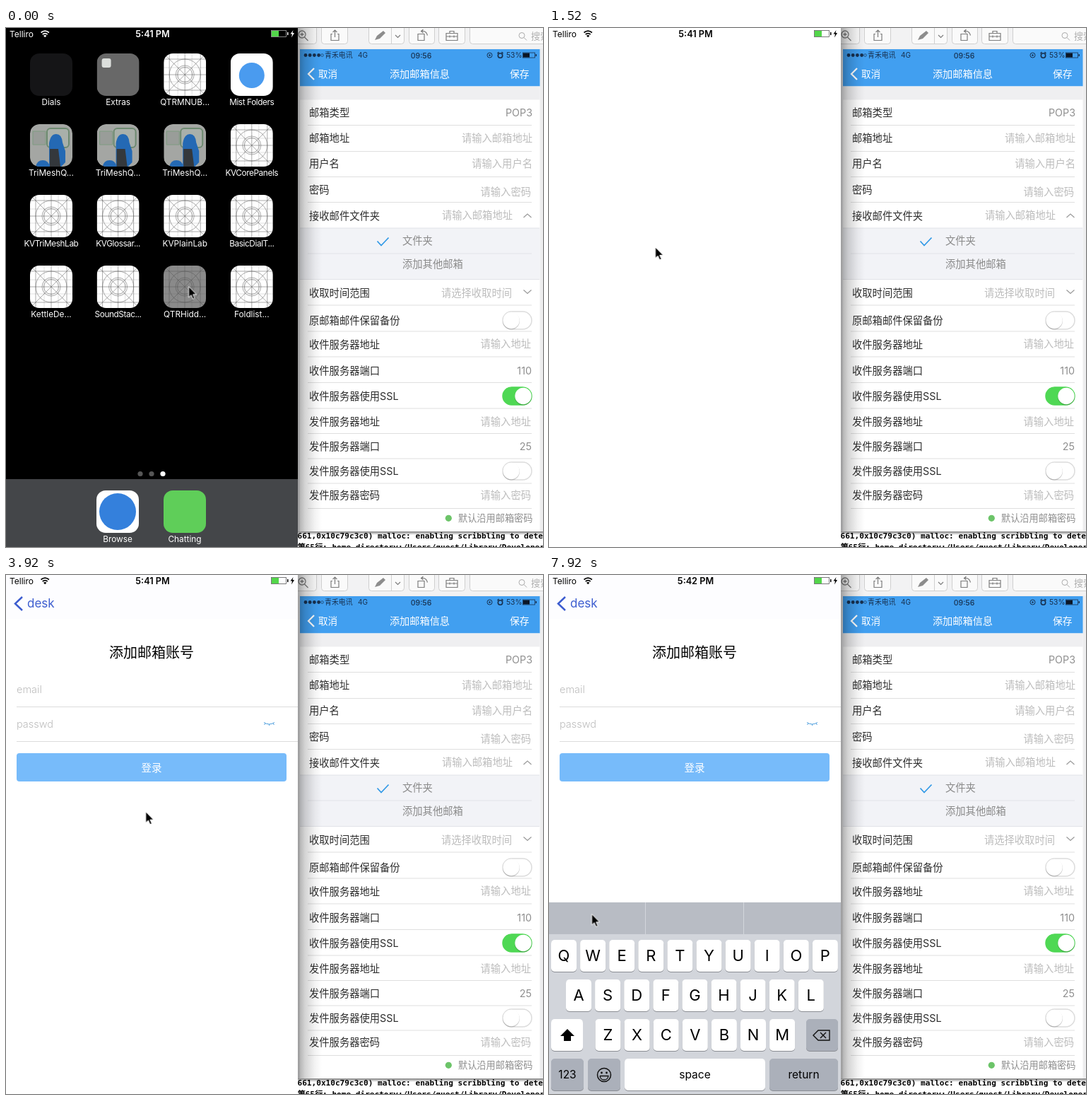
An HTML page for the animation above (8000 ms loop, 760 px wide and 734 px high).

```html
<!DOCTYPE html>
<html lang="zh">
<head>
<meta charset="utf-8">
<title>Mail account demo</title>
<style>
@property --p { syntax: '<number>'; inherits: true; initial-value: 0; }
@property --q { syntax: '<number>'; inherits: true; initial-value: 0; }
@property --k { syntax: '<number>'; inherits: true; initial-value: 0; }

html, body { margin: 0; width: 100%; height: 100%; overflow: hidden; background: #fff; }
#stage {
  position: relative; width: 760px; height: 734px; overflow: hidden;
  font-family: Inter, "Noto Sans CJK SC", "Noto Sans CJK", sans-serif;
  animation: launch 8s linear infinite, push 8s linear infinite, keys 8s linear infinite;
}
#stage div, #stage svg { position: absolute; left: 0; top: 0; }
svg { display: block; overflow: visible; }
#phone { width: 413px; height: 734px; background: #000; overflow: hidden; }
#home {
  width: 413px; height: 734px; transform-origin: 253px 366px;
  transform: scale(calc(1 + 2 * var(--p))); opacity: calc(1 - var(--p));
}
#stage #win {
  left: calc(223px * (1 - var(--p))); top: calc(336px * (1 - var(--p)));
  width: calc(60px + 353px * var(--p)); height: calc(60px + 674px * var(--p));
  border-radius: max(0px, 13px - 27px * var(--p));
  overflow: hidden; animation: tint 8s linear infinite;
}
#win svg { width: 100%; height: 100%; animation: gridOut 8s linear infinite; }
#app { width: 413px; height: 734px; animation: appear 8s step-end infinite; }
#first { width: 413px; height: 734px; background: #fff; transform: translateX(calc(-124px * var(--q))); }
#dim { width: 413px; height: 734px; background: #000; opacity: calc(.11 * var(--q)); }
#form { width: 413px; height: 734px; background: #fff; transform: translateX(calc(413px * (1 - var(--q)))); }
#nav { width: 413px; height: 62px; background: rgba(251, 252, 255, .55); }
#back { opacity: clamp(0, (var(--q) - .82) * 5.6, 1); }
#stage #crumb {
  left: calc(30px + 182px * (1 - var(--q)) - 24px * (1 - var(--q)) * (1 - var(--q)));
  top: 28px; font-size: 17px; line-height: 24px; animation: crumb 8s linear infinite;
}
#status { animation: ink 8s linear infinite; }
#before { animation: before 8s step-end infinite; }
#after { animation: after 8s step-end infinite; }
#keyboard { transform: translateY(calc(271px * (1 - var(--k)))); visibility: visible; }
#pointer { animation: move 8s ease-in-out infinite; }

@keyframes launch {
  0%, 4% { --p: 0; animation-timing-function: cubic-bezier(.5, 0, .9, .6); }
  6% { --p: .15; animation-timing-function: cubic-bezier(.25, .5, .3, 1); }
  10.5%, 100% { --p: 1; }
}
@keyframes push {
  0%, 40% { --q: 0; animation-timing-function: cubic-bezier(.3, .1, .6, .85); }
  43% { --q: .852; animation-timing-function: cubic-bezier(.2, .6, .4, 1); }
  46.25%, 100% { --q: 1; }
}
@keyframes keys {
  0%, 91% { --k: 0; animation-timing-function: cubic-bezier(.2, .7, .2, 1); }
  95.5%, 100% { --k: 1; }
}
@keyframes tint {
  0%, 4% { background: #8a8a8a; }
  6% { background: #dedede; }
  9%, 100% { background: #fff; }
}
@keyframes gridOut {
  0%, 4% { opacity: 1; }
  6% { opacity: .06; }
  7.5%, 100% { opacity: 0; }
}
@keyframes appear { 0% { opacity: 0; } 25%, 100% { opacity: 1; } }
@keyframes crumb { 0%, 40% { color: #111; } 42%, 100% { color: #3f5fd0; } }
@keyframes ink { 0%, 6.2% { color: #fff; } 8%, 100% { color: #000; } }
@keyframes before { 0% { opacity: 1; } 58%, 100% { opacity: 0; } }
@keyframes after { 0% { opacity: 0; } 58%, 100% { opacity: 1; } }
@keyframes move {
  0%, 1% { transform: translate(258.5px, 365.5px); }
  6%, 11% { transform: translate(255.5px, 385px); }
  18.5%, 26% { transform: translate(150.5px, 310px); }
  34%, 46% { transform: translate(221.5px, 373.5px); }
  56%, 90.5% { transform: translate(95.5px, 168.5px); }
  98%, 100% { transform: translate(60.5px, 479.5px); }
}
</style>
</head>
<body>
<div id="stage">
  <svg id="desk" width="760" height="734"></svg>
  <div id="phone">
    <div id="home"><svg id="icons" width="413" height="734"></svg></div>
    <div id="win"><svg viewBox="0 0 60 60" preserveAspectRatio="none"><use href="#grid"/></svg></div>
    <div id="app">
      <div id="first">
        <svg width="413" height="734">
          <rect x="26" y="341" width="361" height="50" fill="#2d00ff"/>
          <path d="M158 367l5-6h4v13h-4z" fill="#15103c"/>
        </svg>
        <div id="dim"></div>
      </div>
      <div id="form">
        <svg width="413" height="734">
          <text x="206" y="117" font-size="20" font-weight="300" text-anchor="middle" fill="#000">添加邮箱账号</text>
          <g font-size="14.5" font-weight="300" fill="#bdbdbd">
            <text x="15" y="167">email</text>
            <text x="15" y="216">passwd</text>
          </g>
          <path d="M15 186.500H413M15 235.500H413" stroke="#dcdcdc"/>
          <path d="M365 208.500q7.500 5 15 0M367 210l-1.500 2M372.500 211v2M378 210l1.500 2" fill="none" stroke="#4c9ddd"/>
          <rect x="15" y="252" width="382" height="40" rx="4" fill="#77bbfa"/>
          <text x="206" y="277.500" font-size="14.5" text-anchor="middle" fill="#fff">登录</text>
        </svg>
      </div>
      <div id="nav"></div>
      <svg id="back" width="40" height="62"><path d="M23 31L13 40.500L23 50" fill="none" stroke="#3c5ccf" stroke-width="2.5"/></svg>
      <div id="crumb">desk</div>
    </div>
    <svg id="status" width="413" height="20" fill="currentColor">
      <text x="5" y="13" font-size="12">Telliro</text>
      <g fill="none" stroke="currentColor" stroke-width="1.7">
        <path d="M49.500 6.500q5.700-4.600 11.400 0M51.700 9q3.500-2.800 7 0"/>
      </g>
      <path d="M53 10.800q2.200-1.600 4.400 0l-2.200 2.400z"/>
      <g font-size="12.7" font-weight="600" text-anchor="middle">
        <text id="before" x="207.500" y="13">5:41 PM</text>
        <text id="after" x="207.500" y="13">5:42 PM</text>
      </g>
      <rect x="375.500" y="3.500" width="21" height="9" fill="none" stroke="currentColor" stroke-opacity=".65" stroke-width=".8"/>
      <rect x="376" y="4" width="10" height="8" fill="#53d64b"/>
      <rect x="398" y="6" width="1.500" height="4"/>
      <path d="M406.500 3l-4 5.500h2.500l-1 5 4-6.500h-2.500z"/>
    </svg>
    <svg id="keyboard" width="413" height="734"></svg>
  </div>
  <svg id="pointer" width="14" height="20">
    <path d="M0 0V15.500L3.600 12.200L6 17.800L8.600 16.700L6.200 11.300H11z" fill="#000" stroke="#fff" stroke-width="1"/>
  </svg>
</div>

<script>
const $ = id => document.getElementById(id);
const rect = (x, y, w, h, fill, more = '') =>
  `<rect x="${x}" y="${y}" width="${w}" height="${h}" fill="${fill}" ${more}/>`;
const text = (x, y, s, size, fill, more = '') =>
  `<text x="${x}" y="${y}" font-size="${size}" fill="${fill}" ${more}>${s}</text>`;
const line = (d, stroke, width = 1) =>
  `<path d="${d}" fill="none" stroke="${stroke}" stroke-width="${width}"/>`;
const dot = (x, y, r, fill, more = '') => `<circle cx="${x}" cy="${y}" r="${r}" fill="${fill}" ${more}/>`;
const MID = 'text-anchor="middle"', END = 'text-anchor="end"';

// Home screen
const defs = `<defs>
  <clipPath id="tile"><rect width="60" height="60" rx="13"/></clipPath>
  <g id="grid" fill="none" stroke="#555" stroke-width=".5">
    <path d="M0 0L60 60M60 0L0 60M30 0V60M0 30H60M8 0V60M52 0V60M0 8H60M0 52H60"/>
    <path d="M20 0V60M40 0V60M0 20H60M0 40H60" stroke-opacity=".35"/>
    <circle cx="30" cy="30" r="10.500"/><circle cx="30" cy="30" r="13"/><circle cx="30" cy="30" r="22"/>
  </g>
  <g id="photo" clip-path="url(#tile)">
    <rect width="60" height="60" fill="#a4a6a3"/>
    <path d="M4 10H22V29H4z" fill="#999d99" stroke="#7f9b80"/>
    <rect x="24" y="6" width="31" height="27" rx="5" fill="#a9b0aa" stroke="#6d8a70" stroke-width="2"/>
    <path d="M8 60q2-9 10-9t10 9z" fill="#2469b4"/>
    <path d="M27 60V27q2-13 10-13t9 12l4 12v16l-6 6z" fill="#2469b4"/>
    <path d="M28 35H40l3 25H28z" fill="#34383c"/>
  </g></defs>`;

const fills = {
  grid: rect(0, 0, 60, 60, '#fff') + '<use href="#grid"/>',
  photo: '<use href="#photo"/>',
  dark: rect(0, 0, 60, 60, '#151517'),
  folder: rect(0, 0, 60, 60, '#686868') + rect(7, 7, 13, 13, '#dcdfdc', 'rx="3"'),
  cloud: rect(0, 0, 60, 60, '#fff') + dot(30, 31, 18, '#4a9bef'),
  web: rect(0, 0, 60, 60, '#fff') + dot(30, 30, 26, '#3480dc'),
  chat: rect(0, 0, 60, 60, '#5fce59'),
  none: ''
};
const apps = [
  ['Dials', 'dark'], ['Extras', 'folder'], ['QTRMNUB...', 'grid'], ['Mist Folders', 'cloud'],
  ['TriMeshQ...', 'photo'], ['TriMeshQ...', 'photo'], ['TriMeshQ...', 'photo'], ['KVCorePanels', 'grid'],
  ['KVTriMeshLab', 'grid'], ['KVGlossar...', 'grid'], ['KVPlainLab', 'grid'], ['BasicDialT...', 'grid'],
  ['KettleDe...', 'grid'], ['SoundStac...', 'grid'], ['QTRHidd...', 'none'], ['Foldlist...', 'grid']
];
const app = (cx, cy, name, kind) =>
  `<g transform="translate(${cx - 30} ${cy - 30})" clip-path="url(#tile)">${fills[kind]}</g>` +
  text(cx, cy + 43, name, 11.8, '#fff', MID + (name.length > 11 ? ' letter-spacing="-.4"' : ''));

$('icons').innerHTML = defs +
  apps.map(([name, kind], i) => app(64 + 94.600 * (i % 4), 66 + 100 * (i >> 2), name, kind)).join('') +
  [190, 206, 222].map(x => dot(x, 630.5, 3.6, x > 210 ? '#fff' : '#565656')).join('') +
  rect(0, 638, 413, 96, '#444649') +
  app(158, 684, 'Browse', 'web') + app(253, 684, 'Chatting', 'chat');

// Keyboard
const key = (x, y, w, label, size = 22, fill = '#fff') =>
  rect(x, y + 1, w, 45, '#8b8e94', 'rx="5"') + rect(x, y, w, 45, fill, 'rx="5"') +
  text(x + w / 2, y + 22.5 + size * .36, label, size, '#000', MID);
const keyRow = (letters, x, y) => [...letters].map((c, i) => key(x + 41.100 * i, y, 36, c)).join('');
const GREY = '#abb0ba';

$('keyboard').innerHTML =
  rect(0, 463, 413, 45, '#b8bcc4') + rect(0, 508, 413, 226, '#d2d5db') +
  line('M136.500 463V508M275.500 463V508', '#d3d6dc') +
  keyRow('QWERTYUIOP', 3, 516) + keyRow('ASDFGHJKL', 24, 572) + keyRow('ZXCVBNM', 65.5, 628) +
  key(3, 628, 45, '') + '<path d="M26 642l10 10h-5v7h-10v-7h-5z"/>' +
  key(364, 628, 45, '', 22, GREY) +
  line('M374 651l7-7h16v14h-16zM384 647l8 8M392 647l-8 8', '#111', 1.4) +
  key(3, 684, 46, '123', 15.5, GREY) + key(55, 684, 46, '', 22, GREY) +
  dot(78, 707, 9.5, 'none', 'stroke="#111" stroke-width="1.5"') + dot(74.5, 704, 1.4, '#111') + dot(81.5, 704, 1.4, '#111') +
  line('M72 708.500h12q-1 5.500-6 5.500t-6-5.500', '#111', 1.3) +
  key(107, 684, 199, 'space', 15.5) + key(312, 684, 97, 'return', 15.5, GREY);

// Right-hand window
const rows = [
  ['邮箱类型', 119.5, 'POP3', 745], ['邮箱地址', 156, '请输入邮箱地址', 745],
  ['用户名', 192, '请输入用户名', 745], ['密码', 229, '请输入密码', 743, 3],
  ['接收邮件文件夹', 266, '请输入邮箱地址', 717, -1], ['收取时间范围', 375, '请选择收取时间', 716],
  ['原邮箱邮件保留备份', 414], ['收件服务器地址', 447.5, '请输入地址', 743, -1],
  ['收件服务器端口', 485, '110', 744], ['收件服务器使用SSL', 521],
  ['发件服务器地址', 557, '请输入地址', 743], ['发件服务器端口', 592, '25', 744],
  ['发件服务器使用SSL', 627], ['发件服务器密码', 661, '请输入密码', 743]
];
const formRow = ([label, y, hint = '', right, shift = 0]) => {
  const latin = /^[\w]+$/.test(hint);
  return text(429, y + 5.3, label, 14.3, '#2c2c2c') +
    text(right || 0, y + 5.3 + shift, hint, 14.3, latin ? '#8f8f8f' : '#bcbcbc', END);
};
const toggle = (y, on) =>
  rect(703, y - 12.5, 41, 25, on ? '#4fd854' : '#fff', `rx="12.500" stroke="${on ? '#4fd854' : '#dcdcdc'}" stroke-width="1.500"`) +
  dot(on ? 732 : 715, y + 1, 12, 'rgba(0,0,0,.2)') + dot(on ? 732 : 715, y, 11.7, '#fff');
const button = (x, w) => rect(x + .5, -5.5, w, 28, '#fafafa', 'rx="4" stroke="#cfcfcf"');
const rules = [137.5, 174.5, 210.5, 246.5, 392, 429, 465, 501.5, 538, 573.5, 609, 644, 679.5];
const ICON = '#7d7d7d', NAVY = '#17304f';

const toolbar = rect(413, 0, 347, 30, '#f2f2f3') +
  button(400, 39) + button(446, 37) + button(513, 50) + button(570, 36) + button(612, 37) + button(656, 130) +
  dot(419, 9, 5, 'none', `stroke="${ICON}" stroke-width="1.300"`) +
  line('M422.500 13l5 5M416.500 9h5M419 6.500v5', ICON, 1.3) +
  line('M462 8.500h-2v9h11v-9h-2M465.500 13V3M462.500 6l3-3 3 3', ICON, 1.2) +
  line('M545.500-5V22', '#cfcfcf') + line('M551 10l3.500 3.500 3.500-3.500', ICON, 1.2) +
  `<path d="M522 17l3-6 9-7 3 3-8 8z" fill="#8d8d8d"/>` +
  line('M583 8.500h9v9h-9zM588 4.500q7-1 8.500 6M590.500 2l-3 2.500 3 2.500', ICON, 1.2) +
  line('M623 7.500h16v10h-16zM628 7V4.500h6V7M623 12h16M628 10.500v3M634 10.500v3', ICON, 1.2) +
  dot(730, 10.5, 4, 'none', 'stroke="#aaa"') + line('M733 13.500l4 4', '#aaa') +
  text(743, 16, '搜索', 13, '#b0b0b0');

const header = rect(416, 30, 339.5, 52.5, '#419ff0') +
  [424, 430.2, 436.4, 442.6].map(x => dot(x, 38.5, 2.4, NAVY)).join('') +
  dot(447.5, 38.5, 1.8, 'none', `stroke="${NAVY}" stroke-width=".7"`) +
  text(451, 42.3, '青禾电讯', 9.9, NAVY) + text(498, 42.3, '4G', 10, NAVY) +
  text(587.5, 42.5, '09:56', 10.5, NAVY, MID + ' font-weight="500"') +
  dot(684.5, 38.5, 3.5, 'none', `stroke="${NAVY}"`) + dot(684.5, 38.5, 1.2, NAVY) +
  dot(699.5, 39, 3.2, 'none', `stroke="${NAVY}" stroke-width="1.600"`) + line('M695.500 36l2-2M703.500 36l-2-2', NAVY, 1.4) +
  text(708, 42.3, '53%', 10.3, NAVY) +
  rect(731.5, 35, 17, 7, 'none', `stroke="${NAVY}" stroke-width=".8"`) + rect(732, 35.5, 9, 6, '#0b1626') +
  rect(749.5, 37, 1.5, 3, NAVY) +
  line('M436 57l-8 8 8 8', '#fff', 2.2) +
  text(442, 69.8, '取消', 13.6, '#fff', 'font-weight="500"') +
  text(585.5, 70, '添加邮箱信息', 14.2, '#fff', MID + ' font-weight="500"') +
  text(713, 69.8, '保存', 13.8, '#fff', 'font-weight="500"');

const mono = 'font-family="DejaVu Sans Mono, monospace" font-weight="700"';
const shade = `<linearGradient id="side">
    <stop offset="0" stop-opacity=".34"/><stop offset=".3" stop-opacity=".17"/>
    <stop offset=".7" stop-opacity=".05"/><stop offset="1" stop-opacity="0"/></linearGradient>
  <linearGradient id="under" x2="0" y2="1"><stop offset="0" stop-opacity=".5"/><stop offset="1" stop-opacity="0"/></linearGradient>`;

$('desk').innerHTML = shade + rect(413, 0, 347, 734, '#fff') + toolbar +
  rect(413, 29, 347, 683, '#ededee') + rect(416, 82, 339.5, 630, '#fff') + header +
  rect(416, 82.5, 339.5, 19, '#efeff1') + rect(416, 283, 339.5, 72.5, '#f2f3f7') +
  line(rules.map(y => `M427 ${y}H744`).join(''), '#dfdfdf') +
  line('M416 283H755M427 319H744M416 355.500H755', '#e2e3e8') +
  rows.map(formRow).join('') +
  line('M525.500 301.500l5.500 6 10.500-11', '#3199e6', 1.7) +
  text(561, 306, '文件夹', 14.3, '#8a8a8a') + text(561, 339, '添加其他邮箱', 14.3, '#8a8a8a') +
  line('M732.500 268l5.500-5 5.500 5M732.500 370.500l5.500 5 5.500-5', '#9a9a9a', 1.2) +
  toggle(413.5, false) + toggle(520.5, true) + toggle(626.5, false) +
  dot(626.3, 693.3, 4.6, '#6cc469') + text(640, 698.2, '默认沿用邮箱密码', 13.2, '#8e8e8e') +
  text(412.5, 722, '661,0x10c79c3c0) malloc: enabling scribbling to dete', 11.1, '#000', mono) +
  text(412.5, 738, '第65行: home directory:/Users/guest/Library/Developer', 11.1, '#000', mono) +
  rect(413, 712, 347, 5, 'url(#under)') + rect(413, 0, 34, 712, 'url(#side)');
</script>
</body>
</html>
```
